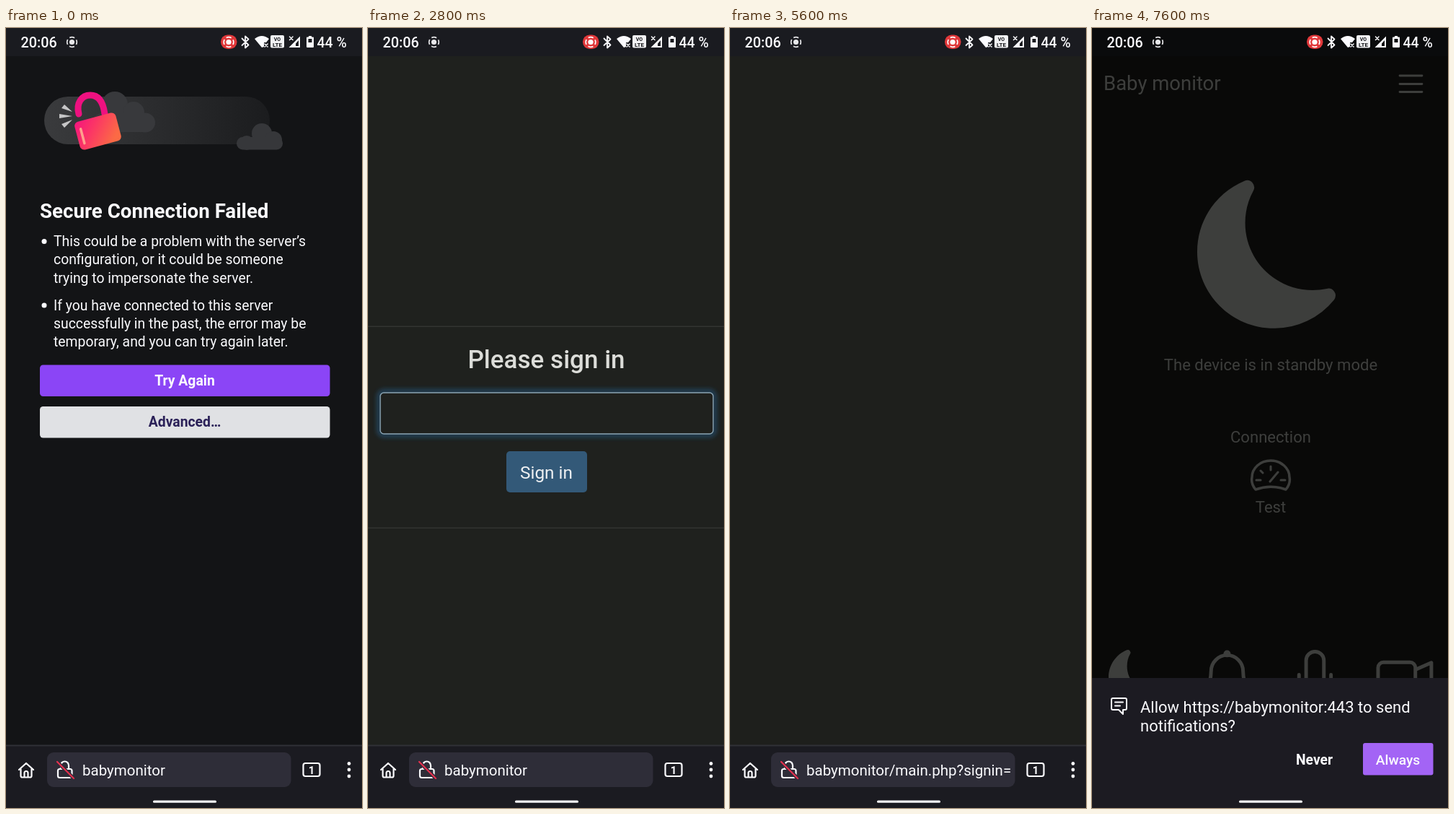
These frames come from a looping animation (494 by 1080 pixels, 8 s). An HTML page:

```html
<!DOCTYPE html>
<html lang="en">
<head>
<meta charset="utf-8">
<title>Baby monitor sign in</title>
<style>
html, body { margin: 0; width: 100%; height: 100%; overflow: hidden; background: #131416; }
svg { display: block; width: 100%; height: 100%; font-family: Roboto, sans-serif; fill: #fbfbfe; }
text { white-space: pre; }
.mid { text-anchor: middle; }
.med { font-weight: 500; }
.bold { font-weight: 700; }
.line { fill: none; stroke: currentColor; stroke-linecap: round; stroke-linejoin: round; }
.ink { fill: #2b2158; }
.page { color: #cfd1cb; fill: #cfd1cb; }
.hint { fill: #74777a; font-size: 14px; }
</style>
</head>
<body>
<svg id="stage" viewBox="0 0 494 1080">
<defs>
  <linearGradient id="fade"><stop stop-color="#3a3b3d"/><stop offset="1" stop-color="#1b1c1e"/></linearGradient>
  <linearGradient id="hot" y2=".6"><stop stop-color="#f5137f"/><stop offset=".45" stop-color="#fb3665"/><stop offset="1" stop-color="#fb6a45"/></linearGradient>
  <linearGradient id="load"><stop stop-color="#7542e5"/><stop offset=".2" stop-color="#9a3fe0"/><stop offset=".5" stop-color="#e3168a"/><stop offset=".8" stop-color="#f04a35"/><stop offset="1" stop-color="#ff9a2a"/></linearGradient>
  <radialGradient id="finger"><stop stop-color="#fff" stop-opacity=".95"/><stop offset=".5" stop-color="#e4e4e4" stop-opacity=".85"/><stop offset="1" stop-color="#ccc" stop-opacity="0"/></radialGradient>
  <filter id="glow" x="-10%" y="-40%" width="120%" height="180%"><feGaussianBlur stdDeviation="3"/></filter>
  <clipPath id="field"><rect x="57" y="1003" width="334" height="48"/></clipPath>
</defs>
</svg>
<script>
const STEP = 200, LOOP = 8000;
const PASSWORD = 'babymonitor';
const ROWS = ['qwertyuiopå', 'asdfghjkløæ', 'zxcvbnm'];
const HINTS = ['%^~|[]<>{}', '@#&*-+=()öä', '_$"\':;/'];
const stage = document.getElementById('stage');
const $ = id => document.getElementById(id);

const esc = s => s.replace(/&/g, '&amp;').replace(/</g, '&lt;');
const text = (x, y, size, s, cls = '', extra = '') =>
  `<text x="${x}" y="${y}" font-size="${size}" class="${cls}" ${extra}>${esc(s)}</text>`;
const lines = (x, size, rows, cls) => rows.map(([y, s]) => text(x, y, size, s, cls)).join('');
const rect = (x, y, w, h, fill, r = 0, extra = '') =>
  `<rect x="${x}" y="${y}" width="${w}" height="${h}" rx="${r}" fill="${fill}" ${extra}/>`;
const circle = (x, y, r, extra = '') => `<circle cx="${x}" cy="${y}" r="${r}" ${extra}/>`;
const stroke = (d, w, extra = '') => `<path class="line" d="${d}" stroke-width="${w}" ${extra}/>`;
const group = (id, body, extra = '') => `<g id="${id}" ${extra}>${body}</g>`;
const button = (y, fill, s, cls) =>
  rect(47, y, 402.5, 43.5, fill, 4.5) + text(248, y + 28.3, 19.35, s, 'mid bold ' + cls);

const MOON = '<path d="M6 .28a.77.77 0 0 1 .08.86 7.2 7.2 0 0 0-.88 3.46c0 4.02 3.28 7.27 7.32 7.27q.8 0 1.53-.16a.79.79 0 0 1 .81.32.73.73 0 0 1-.03.89A8.35 8.35 0 0 1 8.34 16C3.73 16 0 12.29 0 7.71 0 4.27 2.11 1.31 5.12.06A.75.75 0 0 1 6 .28"/>';
const BELL = stroke('M1.9 12.5h12.2c-1.1-2-1.6-5-1.6-6.5a4.5 4.5 0 0 0-9 0c0 1.500-.5 4.500-1.600 6.500z', 1) +
  circle(8, 1.1, 1) + '<path d="M6 14h4a2 2 0 0 1-4 0"/>';
const MIC = stroke('M5.5 3a2.500 2.500 0 0 1 5 0v5a2.500 2.500 0 0 1-5 0zM3.500 7v1a4.500 4.500 0 0 0 9 0V7M8 12.500v3M4.500 15.500h7', 1);
const CAMERA = stroke('M2 3.500h7.500a1.500 1.500 0 0 1 1.500 1.500v6a1.500 1.500 0 0 1-1.500 1.500H2A1.500 1.500 0 0 1 .5 11V5A1.500 1.500 0 0 1 2 3.500M11 5.600l4.500-2v8.800l-4.500-2', 1);
const icon = (x, y, k, body) => `<g transform="translate(${x} ${y}) scale(${k})">${body}</g>`;

const art = rect(53, 95, 313, 66, 'url(#fade)', 33) +
  `<g fill="#38393c">${circle(151, 106, 18)}${circle(177, 117, 15)}${circle(193, 131, 13.5)}${rect(120, 118, 87, 26, '#38393c', 13)}</g>` +
  `<g fill="#36373a">${circle(355, 146, 14)}${circle(371, 155, 12)}${circle(334, 159, 10)}${rect(320, 151, 64, 17.500, '#36373a', 8.500)}</g>` +
  '<path fill="#c6c6c7" d="M81 106l11 10-15-5zM74 119l18 3-18 3zM77 133l15-6-11 11z"/>' +
  stroke('M101 119C97 104 105 93 117 93s18 11 20 26', 9, 'style="color:#ee1180"') +
  `<g transform="translate(127.5 143) rotate(-15)">${rect(-29.5, -20, 59, 40, 'url(#hot)', 6)}${rect(-24, -11, 3.5, 24, '#ffa08c', 1.700)}</g>`;

const failPage = rect(0, 39, 494, 955, '#131416') + art +
  text(47, 263, 27.7, 'Secure Connection Failed', 'bold') +
  circle(53, 295.500, 3.500) + circle(53, 384, 3.500) +
  lines(66, 19.35, [
    [302, 'This could be a problem with the server’s'],
    [327, 'configuration, or it could be someone'],
    [352.500, 'trying to impersonate the server.'],
    [390.500, 'If you have connected to this server'],
    [416, 'successfully in the past, the error may be'],
    [441, 'temporary, and you can try again later.']]) +
  button(466.500, '#8b45f6', 'Try Again', '') +
  button(524, '#e0e1e4', 'Advanced…', 'ink') +
  group('advice', lines(47, 19.35, [
    [673, 'Someone could be trying to impersonate the'],
    [700.500, 'site and you should not continue.'],
    [756, 'Websites prove their identity via certificates.'],
    [811.500, 'because its certificate issuer is unknown, the'],
    [839, 'certificate is self-signed, or the server is not'],
    [867, 'sending the correct intermediate certificates.']]) +
    '<text x="47" y="784" font-size="19.35">Telfern does not trust <tspan class="bold">https://babymonitor/</tspan></text>' +
    button(893.500, '#e0e1e4', 'Accept the Risk and Continue', 'ink'));

const signPage = rect(0, 39, 494, 955, '#1f211e') +
  group('form', rect(0, 219.500, 494, 1.500, '#323431') + rect(0, 498.500, 494, 1.500, '#323431') +
    text(247.500, 278, 35, 'Please sign in', 'mid med', 'fill="#dcddd9"') +
    rect(15, 310, 466, 61, 'none', 7, 'id="halo" stroke="#234a68" stroke-width="5" filter="url(#glow)"') +
    rect(17, 312, 462, 57, '#1f211e', 5, 'id="input" stroke-width="1.4"') +
    group('dots', [...PASSWORD].map((_, i) => circle(40 + 8.35 * i, 340, 2.800)).join(''), 'fill="#b2b3af"') +
    rect(189, 390, 118, 63, '#2f5471', 9, 'id="ring" stroke="#374a56" stroke-width="6"') +
    rect(192, 393, 112, 57, '#335978', 5, 'id="sign"') +
    text(247.500, 431, 24.400, 'Sign in', 'mid', 'fill="#eef0f2"')) +
  rect(491.500, 51, 2.500, 912, '#71736f', 1, 'id="scroll"');

const tabs = [[62, 'Standby', MOON], [187, 'Notify', BELL], [309, 'Listen', MIC], [433.500, 'Observe', CAMERA]];
const mainPage = rect(0, 39, 494, 955, '#1e1f1c') + group('content',
  text(16, 86, 27.500, 'Baby monitor') + stroke('M427 66h31M427 77.500h31M427 88.500h31', 2.800) +
  icon(146, 211, 12.8, MOON) +
  text(248, 474, 22.100, 'The device is in standby mode', 'mid') +
  text(248, 574, 22.100, 'Connection', 'mid') +
  stroke('M227 639c-5-6-6-12-5-17a26 23 0 0 1 52 0c1 5 0 11-5 17-14-5-28-5-42 0z', 3.500) +
  stroke('M248 607v5M228 626h6M262 626h6M234 613l3 3M247 628l11-13', 3) +
  text(248, 671, 22.100, 'Test', 'mid') +
  tabs.map(([x, s, shape]) => icon(x - 39, 861, 4.930, shape) + text(x, 974, 22, s, 'mid')).join(''), 'class="page"');

const dialog = rect(10, 359.500, 476, 312, '#2a2c2a', 6, 'stroke="#444644" stroke-width="1.3"') +
  rect(10, 528.500, 476, 1.800, '#4a4c4a') +
  `<g fill="#e0e1df" style="color:#e0e1df">${circle(60.500, 444.500, 26, 'class="line" stroke-width="4"')}
    <path d="M57.500 432a3 3 0 0 1 6 0l-1.500 16h-3z"/>${circle(60.500, 455, 3)}` +
  lines(111, 27.600, [[412, 'Premission is required'], [453.500, 'to use browser'], [495, 'notifications']], 'med') +
  text(66, 577, 22, "Don't ask again") + '</g>' +
  stroke('M448 435l19 19M467 435l-19 19', 2.800, 'style="color:#a8aaa8"') +
  rect(33.500, 559, 21, 21, '#1f211f', 4.500, 'stroke="#4c4e4c" stroke-width="1.3"') +
  rect(33, 597, 204, 52, '#325a7c', 4.500) + rect(254, 597, 202, 52, '#5c5e5c', 4.500) +
  text(135, 630, 22, 'Grant permission', 'mid') + text(355, 630, 22, 'Continue without', 'mid');

const toolbar = rect(0, 993, 494, 87, '#1b1b21') + rect(0, 992.500, 494, 2, '#303137') +
  rect(57, 1003, 338.500, 48, '#2e2d38', 9) +
  stroke('M18 1027l10-9 10 9M20.500 1026v9.500a2 2 0 0 0 2 2h11a2 2 0 0 0 2-2V1026M25.500 1037v-5.500a2.500 2.500 0 0 1 5 0v5.500', 2.200) +
  rect(72, 1026, 19.500, 12, 'none', 2.500, 'class="line" stroke-width="2.2"') +
  stroke('M76 1026v-5a5.500 5.500 0 0 1 11 0v5', 2.200) +
  stroke('M71 1016l23 23', 5, 'style="color:#2e2d38"') + stroke('M71 1016l23 23', 2.200, 'style="color:#e4304e"') +
  text(106, 1035, 20.500, '', '', 'id="url" clip-path="url(#field)"') +
  rect(412.500, 1018, 23, 18, 'none', 3, 'class="line" stroke-width="2.2"') +
  text(424, 1032.500, 15, '1', 'mid bold') +
  [1018.500, 1027, 1036].map(y => circle(476, y, 2.400)).join('') +
  rect(0, 992, 0, 5, 'url(#load)', 0, 'id="progress"');

const rowTop = r => 768.500 + 64.300 * r;
const keyX = (r, i) => (r === 2 ? 113 : 24) + 44.850 * i;
const keyAt = c => {
  const r = ROWS.findIndex(row => row.includes(c));
  return [keyX(r, ROWS[r].indexOf(c)) - 3, rowTop(r) + 34];
};
const keyboard = rect(0, 705, 494, 375, '#17191f') +
  [...'1234567890'].map((c, i) => rect(2 + 49.800 * i, 714, 43.500, 48, '#34383b', 5) +
    text(24.500 + 49.800 * i, 748, 26, c, 'mid', 'fill="#999c9e"')).join('') +
  ROWS.map((row, r) => [...row].map((c, i) => rect(keyX(r, i) - 19, rowTop(r), 38, 57.500, '#34383b', 5) +
    text(keyX(r, i), rowTop(r) + 20, 14, HINTS[r][i] || '', 'mid hint') +
    text(keyX(r, i), rowTop(r) + 47, 22.500, c, 'mid')).join('')).join('') +
  stroke('M31 914l11 13h-5v10h-12v-10h-5z', 1.800) +
  stroke('M453 926l7-9h14a2 2 0 0 1 2 2v14a2 2 0 0 1-2 2h-14zM463 922l8 8M471 922l-8 8', 1.800) +
  rect(127, 961, 242, 57.500, '#3a3d3f', 5) + text(247.500, 1005, 9.300, 'Marrowick GlideKey', 'mid', 'fill="#b4b6b8"') +
  text(9, 1000, 26.700, '123') + text(94, 1006, 22, ',', 'mid') + text(403, 1005, 22, '.', 'mid') +
  text(403, 980, 13, ',!?', 'mid hint') +
  `<g style="color:#85888a" fill="#85888a">${icon(87.500, 969, .800, MIC)}
    ${circle(465, 975, 6, 'class="line" stroke-width="1.2"')}${stroke('M462 977q3 3 6 0M463 973h.1M467 973h.1', 1.200)}</g>` +
  stroke('M458 999l5 5 10-11', 1.800) + stroke('M28 1049l5 5 5-5', 2.200) +
  [0, 1, 2].map(r => stroke(`M${454 + 2 * r} ${1046.500 + 4 * r}H${473 - 2 * r}`, 2.500, 'style="stroke-linecap:butt" stroke-dasharray="2.6 1.5"')).join('') +
  stroke('M460 1055h7', 2);

const prompt = rect(0, 900, 494, 180, '#1c1b22') +
  stroke('M29 928h17a2 2 0 0 1 2 2v12a2 2 0 0 1-2 2h-3v6l-6-6h-8a2 2 0 0 1-2-2v-12a2 2 0 0 1 2-2M32 933.500h11M32 938.500h7', 2) +
  lines(67, 22, [[947.500, 'Allow https://babymonitor:443 to send'], [974, 'notifications?']]) +
  text(308.500, 1020, 19.300, 'Never', 'mid bold') +
  rect(376, 990, 97.500, 44.500, '#a364f5', 3) + text(424.500, 1020, 19.200, 'Always', 'mid med');

const target = (x, color) => `<g style="color:${color}" fill="${color}">${circle(x, 19.500, 3.600)}
  ${circle(x, 19.500, 6.800, 'class="line" stroke-width="1.7" stroke-dasharray="7.2 3.48" stroke-dashoffset="3.6" style="stroke-linecap:butt"')}</g>`;
const status = rect(0, 0, 494, 39, '#1a1b20', 0, 'id="top"') +
  text(20.500, 27, 19.800, '20:06', 'med') + target(91.500, '#e8e8ea') +
  rect(298, 9.500, 22.500, 19.500, '#e0383a', 9.500) + target(309, '#fff') +
  stroke('M327.500 14.500l9 9-4.500 4V11.500l4.500 4-9 8.500', 1.800) +
  '<path d="M345 15q10-8 20 0l-4 5h-3v6l-3 1z"/>' + stroke('M359 22l4 4M363 22l-4 4', 1.600) +
  rect(367, 10, 19, 17.500, '#f2f2f4', 2) + text(376.500, 17.500, 7, 'VO', 'mid bold', 'fill="#16171b"') +
  text(376.500, 25.500, 8, 'LTE', 'mid bold', 'fill="#16171b"') +
  '<path fill-rule="evenodd" d="M408 11.500V27h-15.500zM406 17l-7 8h7z"/><path d="M393 26.500h9V20z"/>' +
  stroke('M393.500 12l4.500 4.500M398 12l-4.500 4.500', 1.500) +
  '<path fill-rule="evenodd" d="M420 11h4v1.500h2a1 1 0 0 1 1 1V26a1 1 0 0 1-1 1h-8a1 1 0 0 1-1-1V13.500a1 1 0 0 1 1-1h2zM419.500 15v5h5v-5z"/>' +
  text(431.500, 27, 19.500, '44 %', 'med');

stage.style.color = '#fbfbfe';
stage.insertAdjacentHTML('beforeend',
  group('fail', failPage) + group('signin', signPage) + group('main', mainPage) +
  rect(0, 39, 494, 955, '#000', 0, 'id="backdrop" opacity=".45"') + group('dialog', dialog) +
  group('bar', toolbar) + group('keys', keyboard) +
  rect(0, 39, 494, 1041, '#000', 0, 'id="scrim" opacity=".7"') + group('prompt', prompt) +
  status + circle(0, 0, 16, 'id="touch" fill="url(#finger)"') +
  rect(204, 1069.500, 88, 3.300, '#f4f4f6', 1.600));

const show = (id, on) => $(id).setAttribute('display', on ? 'inline' : 'none');
const set = (id, name, value) => $(id).setAttribute(name, value);

function finger(t, typed) {
  if (t >= 400 && t < 800) return [250, 547];
  if (t >= 1600 && t < 2000) return [250, 917];
  if (t >= 3000 && t < 4000) return keyAt(PASSWORD[typed]);
  if (t === 4000) return [250, 424];
  if (t >= 6800 && t < 7200) return [168, 627];
}

function progress(t) {
  if (t >= 2000 && t < 2800) return t < 2200 ? 49 : 123;
  return t >= 4200 && t < 5000 ? 397 : 0;
}

function draw(time) {
  const t = Math.floor(time % LOOP / STEP) * STEP;
  const typing = t >= 3000 && t < 4200;
  const typed = t >= 4000 ? PASSWORD.length : Math.max(0, (t - 3000) / 100);
  const sent = t >= 4200, asking = t >= 6000 && t < 7200, prompted = t >= 7400;

  show('fail', t < 2800);
  show('advice', t >= 800);
  show('signin', t >= 2800 && t < 5000);
  show('main', t >= 5000);
  show('content', t >= 5800);
  set('content', 'opacity', t < 7200 ? .2 : 1);
  show('backdrop', asking);
  show('dialog', asking);
  set('dialog', 'opacity', t === 6000 ? .5 : 1);
  set('dialog', 'transform', `translate(0 ${t === 6000 ? -20 : 0})`);

  set('form', 'transform', `translate(0 ${typing ? 0 : 193})`);
  show('halo', !sent);
  set('input', 'stroke', sent ? '#565855' : '#8ba5b4');
  show('ring', sent);
  show('sign', !sent);
  show('scroll', sent && t < 4600);
  [...$('dots').children].forEach((dot, i) => dot.setAttribute('display', i < typed ? 'inline' : 'none'));

  show('keys', typing);
  set('bar', 'transform', `translate(0 ${typing ? -350 : 0})`);
  set('progress', 'width', progress(t));
  $('url').textContent = t < 5000 ? 'babymonitor' : 'babymonitor/main.php?signin=1';

  show('scrim', prompted);
  show('prompt', prompted);
  set('top', 'fill', prompted ? '#0a0b0c' : asking ? '#15161b' : '#1a1b20');

  const spot = finger(t, typed);
  show('touch', spot);
  if (spot) set('touch', 'transform', `translate(${spot})`);
}

const start = performance.now();
function tick() {
  draw(performance.now() - start);
  requestAnimationFrame(tick);
}
tick();
</script>
</body>
</html>
```
